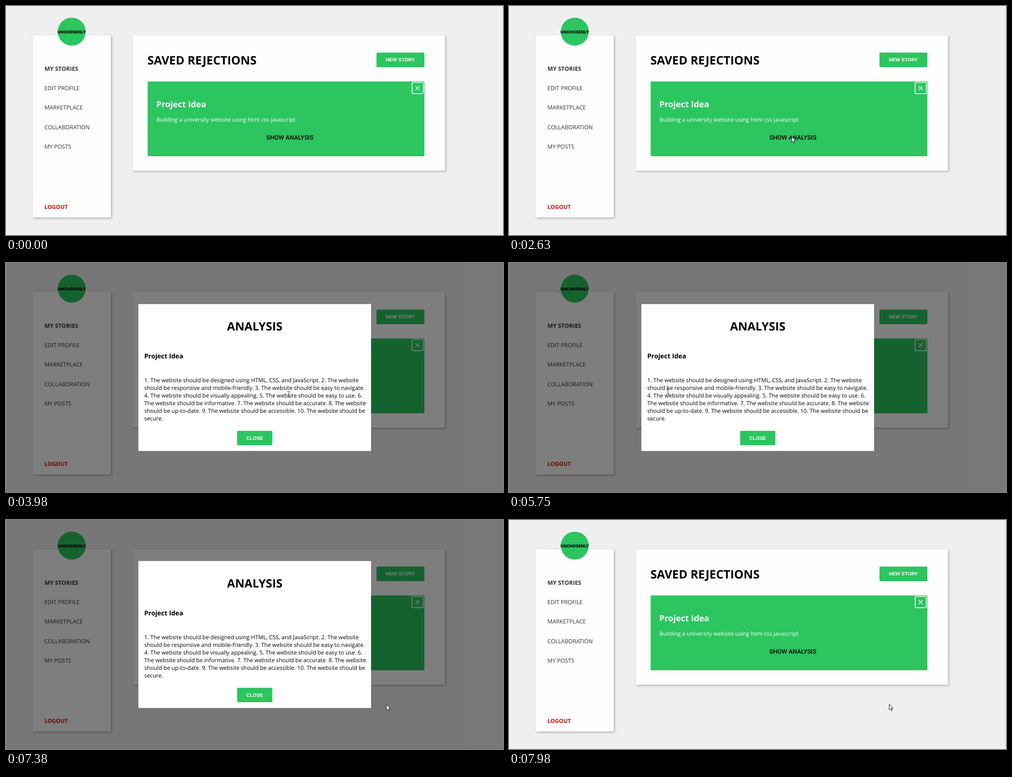
These frames come from a looping animation (1100 px wide and 509 px high, 8 s). An HTML page:

```html
<!DOCTYPE html>
<html lang="en">
<head>
<meta charset="utf-8">
<title>Saved rejections</title>
<style>
  html, body { margin: 0; width: 100%; height: 100%; overflow: hidden; background: #efefef; }
  svg { display: block; width: 100%; height: 100%; }
  text { font-family: "Open Sans", "Noto Sans", sans-serif; font-size: 12.4px; text-rendering: geometricPrecision; }
  .b { font-weight: 700; }
  .mid { text-anchor: middle; }
  .title { font-size: 26px; }
  .btn { font: 700 10.75px "Liberation Sans", Arial, sans-serif; fill: #fff; text-anchor: middle; }
  .show { font: 500 13.55px Roboto, sans-serif; text-anchor: middle; }
  .brand { font: 800 9px Inter, sans-serif; text-anchor: middle; }
  .panel { fill: #fefefe; filter: drop-shadow(2px 2px 2.5px rgba(0, 0, 0, .27)); }
  .green { fill: #2cc55f; }
  .nav { fill: #333; }
  .nav text { font-size: 12.5px; }
  .white { fill: #fff; }
</style>
</head>
<body>
<svg viewBox="0 0 1100 509" preserveAspectRatio="none">
  <rect width="1100" height="509" fill="#efefef"/>

  <rect class="panel" x="59" y="65" width="173" height="405" rx="2"/>
  <circle class="green" cx="145.5" cy="57" r="31"/>
  <text class="brand" x="145.5" y="61">UNCHOSENLY</text>
  <g class="nav">
    <text class="b" x="85.2" y="144.2" style="font-size:12.8px">MY STORIES</text>
    <text x="85" y="187.3">EDIT PROFILE</text>
    <text x="85" y="230.4">MARKETPLACE</text>
    <text x="85" y="273.5">COLLABORATION</text>
    <text x="85" y="316.7">MY POSTS</text>
  </g>
  <text class="b" x="85" y="451.3" fill="#d01008">LOGOUT</text>

  <rect class="panel" x="281" y="65" width="690.5" height="301" rx="2"/>
  <text class="b title" x="313" y="130.3">SAVED REJECTIONS</text>
  <rect class="green" x="820" y="103.5" width="106" height="32.5" rx="2"/>
  <text class="btn" x="872.7" y="123">NEW STORY</text>
  <rect class="green" x="313.5" y="167.7" width="612.5" height="166.3" rx="2"/>
  <rect x="898.8" y="170" width="24.8" height="24.8" rx="2.5" fill="none" stroke="#fff" stroke-width="1.7"/>
  <path d="M906.5 178l9 9m0-9l-9 9" stroke="#fff" stroke-width="1.5"/>
  <text class="b white" x="332.5" y="224.8" style="font-size:18.6px">Project Idea</text>
  <text class="white" x="333" y="256.5">Building a university website using html css javascript</text>
  <text class="show" x="628.3" y="297.4">SHOW ANALYSIS</text>

  <rect id="dim" width="1100" height="509" fill-opacity=".5"/>
  <text id="loading" class="mid white" x="550.5" y="260">Loading...</text>

  <g id="modal">
    <rect x="293" y="91.3" width="515" height="326.5" fill="#fff"/>
    <text class="b mid title" x="550.5" y="149.6" style="font-size:25.6px">ANALYSIS</text>
    <text class="b" x="306" y="211.6" style="font-size:14.5px">Project Idea</text>
    <g id="lines"></g>
    <rect class="green" x="511.5" y="373" width="78" height="32" rx="2"/>
    <text class="btn" x="550.5" y="392.6">CLOSE</text>
  </g>

  <g id="cursor">
    <path id="arrow" d="M.5 .7V13.2L3.4 10.5L5.5 15.3L7.5 14.4L5.4 9.8H9.4Z" fill="#fff" stroke="#111" stroke-width="1"/>
    <path id="hand" d="M-1.2 10V1.7Q0 .2 1.2 1.7V6L6.5 7.2Q7.8 7.6 7.7 9L6.8 15.5H-.5L-4.3 10.2Q-4 8.2-1.2 10Z" fill="#fff" stroke="#111"/>
    <path id="beam" d="M-2 -4.5H0L1 -3.5L2 -4.5H4M1 -3.5V7.5M-2 8.5H0L1 7.5L2 8.5H4" fill="none" stroke="#222"/>
  </g>
</svg>
<script>
const LOOP = 8000, STEP = 67.3;
const el = id => document.getElementById(id);
const show = (id, on) => el(id).style.display = on ? "" : "none";

[
  "1. The website should be designed using HTML, CSS, and JavaScript. 2. The website",
  "should be responsive and mobile-friendly. 3. The website should be easy to navigate.",
  "4. The website should be visually appealing. 5. The website should be easy to use. 6.",
  "The website should be informative. 7. The website should be accurate. 8. The website",
  "should be up-to-date. 9. The website should be accessible. 10. The website should be",
  "secure."
].forEach((line, i) => {
  const t = document.createElementNS("http://www.w3.org/2000/svg", "text");
  t.setAttribute("x", 306);
  t.setAttribute("y", 264.5 + i * 17.15);
  t.textContent = line;
  el("lines").append(t);
});

const smooth = u => u * u * (3 - 2 * u);
const out = u => 1 - (1 - u) ** 2;

// start time, number of steps, easing, from, bend, to
const moves = [
  [1070, 12, out, [963, 500], [797, 402.5], [631, 305]],
  [1880, 4, out, [631, 305], [627, 296], [625, 290]],
  [4530, 12, smooth, [625, 290], [477, 288], [328, 274]],
  [5550, 12, smooth, [328, 274], [378, 283], [385, 357]],
  [6360, 1, smooth, [385, 357], [385, 359], [385, 361]],
  [6560, 12, smooth, [385, 361], [640, 505], [840, 412]],
  [7380, 1, smooth, [840, 412], [841, 411], [841.5, 409.5]],
  [7980, 1, smooth, [841.5, 409.5], [841, 409], [841, 408.7]]
];

function place(t) {
  const move = moves.findLast(m => t >= m[0]);
  if (!move) return null;
  const [start, count, ease, a, b, c] = move;
  const k = Math.min(count, Math.floor((t - start) / STEP + 0.05) + 1);
  const s = ease(k / count), r = 1 - s;
  return a.map((v, i) => r * r * v + 2 * r * s * b[i] + s * s * c[i]);
}

function draw(t) {
  const open = t >= 3980 && t < 7580;
  show("dim", t >= 2700 && t < 7580);
  show("loading", t >= 2700 && t < 3980);
  show("modal", open);

  const p = place(t);
  show("cursor", p);
  if (!p) return;
  el("cursor").setAttribute("transform", `translate(${p[0]} ${p[1]})`);
  const beam = open && t < 6560 && p[1] < 353;
  const hand = t >= 1950 && t < 2560;
  show("beam", beam);
  show("hand", hand);
  show("arrow", !beam && !hand);
}

const begin = performance.now();
function tick() {
  draw((performance.now() - begin) % LOOP);
  requestAnimationFrame(tick);
}
draw(0);
requestAnimationFrame(tick);
</script>
</body>
</html>
```
